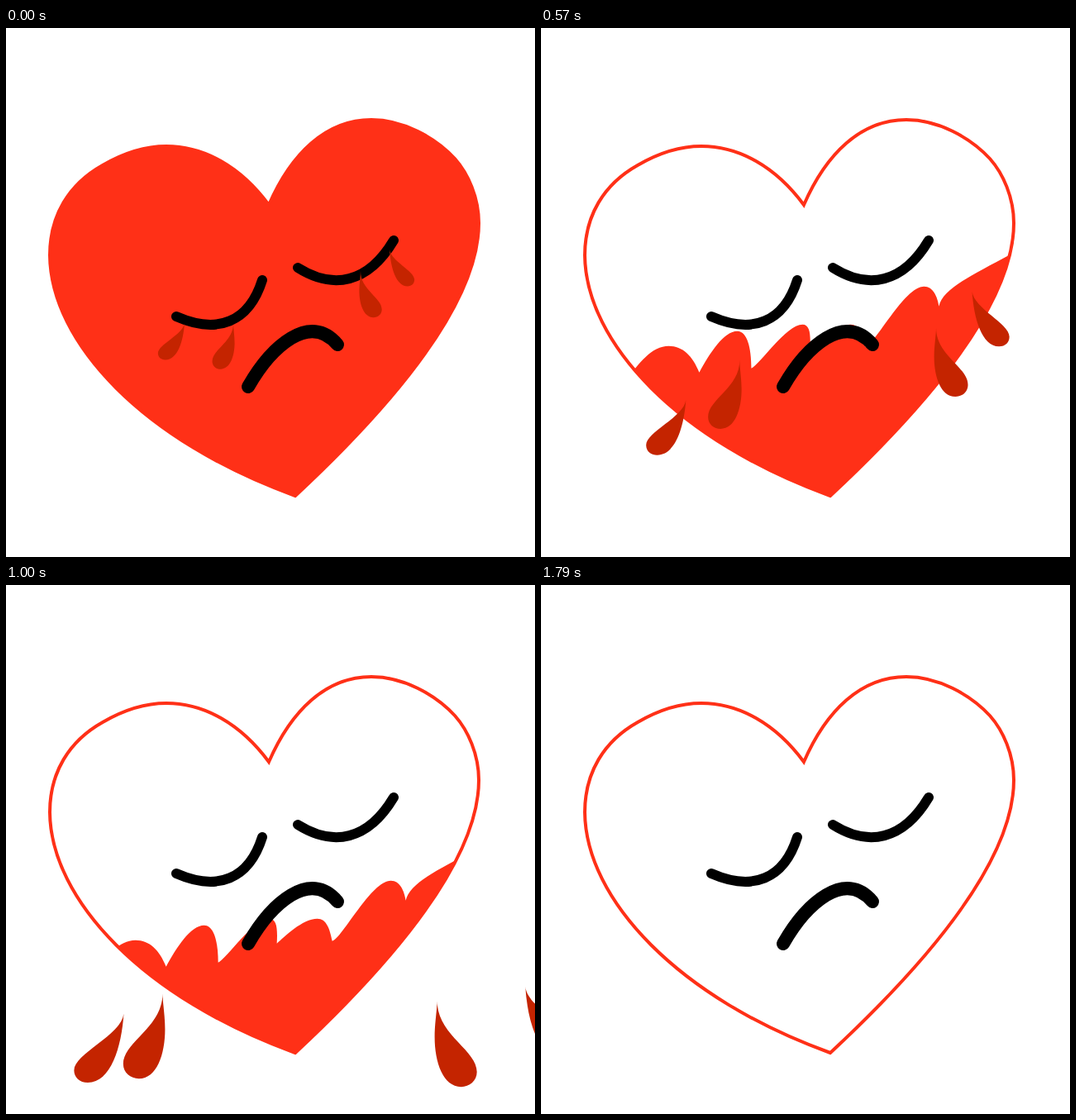
These frames come from a looping animation (640 px wide and 640 px high, 1930 ms). An HTML page:

```html
<!DOCTYPE html>
<html lang="en">
<head>
<meta charset="utf-8">
<title>Draining heart</title>
<style>
  html, body { margin: 0; height: 100%; overflow: hidden; background: #fff; }
  svg { display: block; width: 100%; height: 100%; }
  .line { fill: none; stroke-linecap: round; stroke: #000; stroke-width: 12; }
</style>
</head>
<body>
<svg viewBox="0 0 640 640">
  <defs>
    <path id="heart" d="M318 214C284 168 240 143 194 143C166 143 141 152 117 166C76 189 53 227 53 275
      C54 381 167 500 350 566C495 431 572 320 572 236C572 205 559 176 543 158
      C519 132 480 111 442 111C387 111 345 152 318 214Z"/>
    <path id="wide" d="M0 0C-3 28-65 52-65 74C-65 83-58 90-47 90C-17 90-3 44 0 0Z"/>
    <path id="slim" d="M0 0C1 42-48 60-48 87C-48 98-39 105-29 105C-7 105 3 75 3 45C3 28 0 12 0 0Z"/>
    <clipPath id="inside"><use href="#heart"/></clipPath>
  </defs>
  <g clip-path="url(#inside)">
    <path id="liquid" fill="#ff3017" d="M-100 362H34C50 338 62 323 80 323C92 323 100 335 106 353
      C122 330 138 310 158 310C175 310 187 322 195 342
      C208 318 225 292 241 292C253 292 258 312 258 337
      C268 333 300 284 320 284C329 284 330 296 329 314
      C338 306 360 284 378 284C389 284 393 296 396 311
      C408 308 443 238 467 238C478 238 483 250 485 262
      C489 240 530 222 570 200L700 130V1000H-100Z"/>
  </g>
  <use href="#heart" fill="none" stroke="#ff3017" stroke-width="4"/>
  <path class="line" d="M206 349C256 371 294 356 310 305"/>
  <path class="line" d="M353 290C396 317 438 309 469 257"/>
  <path class="line" style="stroke-width:16" d="M293 434C321 385 368 343 401 383"/>
  <g fill="#c42400">
    <use class="drop" href="#wide"/>
    <use class="drop" href="#slim"/>
    <use class="drop" href="#slim"/>
    <use class="drop" href="#wide"/>
  </g>
</svg>
<script>
const LOOP = 1930, FPS = 14, FALL_STEPS = 24;
const liquid = document.getElementById('liquid');
const nodes = document.querySelectorAll('.drop');

// Each drop's tip falls along one cubic Bézier curve.
const drops = [
  { path: [[216, 357], [177, 451], [133, 542], [83, 632]], width: 0.96, height: 0.96 },
  { path: [[275, 357], [301, 338], [73, 543], [237, 673]], width: 1.03, height: 1.03 },
  { path: [[429, 294], [421, 250], [673, 617], [385, 717]], width: -1.04, height: 1.04 },
  { path: [[464, 268], [400, 224], [826, 458], [614, 1026]], width: -0.9, height: 0.96 }
];

function pointOn([a, b, c, d], u) {
  const v = 1 - u;
  return [0, 1].map(i =>
    v ** 3 * a[i] + 3 * v * v * u * b[i] + 3 * v * u * u * c[i] + u ** 3 * d[i]);
}

function draw(step) {
  // The level eases down, then slides away to the lower right.
  const u = Math.min(step / 10, 1), rest = 1 - u * u * (3 - 2 * u);
  const late = Math.max(step - 10, 0);
  const dx = -5 + 14 * rest + 0.0125 * late ** 4.1;
  const dy = 106.5 - 306 * rest + 0.48 * late ** 2.39;
  liquid.setAttribute('transform', `translate(${dx} ${dy})`);

  const size = 0.515 + 0.032 * step;
  drops.forEach(({ path, width, height }, i) => {
    const [x, y] = pointOn(path, step / FALL_STEPS);
    nodes[i].setAttribute('transform',
      `translate(${x} ${y}) scale(${width * size} ${height * size})`);
  });
}

const start = performance.now();
function tick() {
  // Steps begin at times rounded to 10 ms.
  const time = (performance.now() - start) % LOOP;
  const rounded = Math.floor(time / 10) * 10 + 5;
  draw(Math.min(FALL_STEPS + 1, Math.floor(rounded * FPS / 1000)));
  requestAnimationFrame(tick);
}
tick();
</script>
</body>
</html>
```
